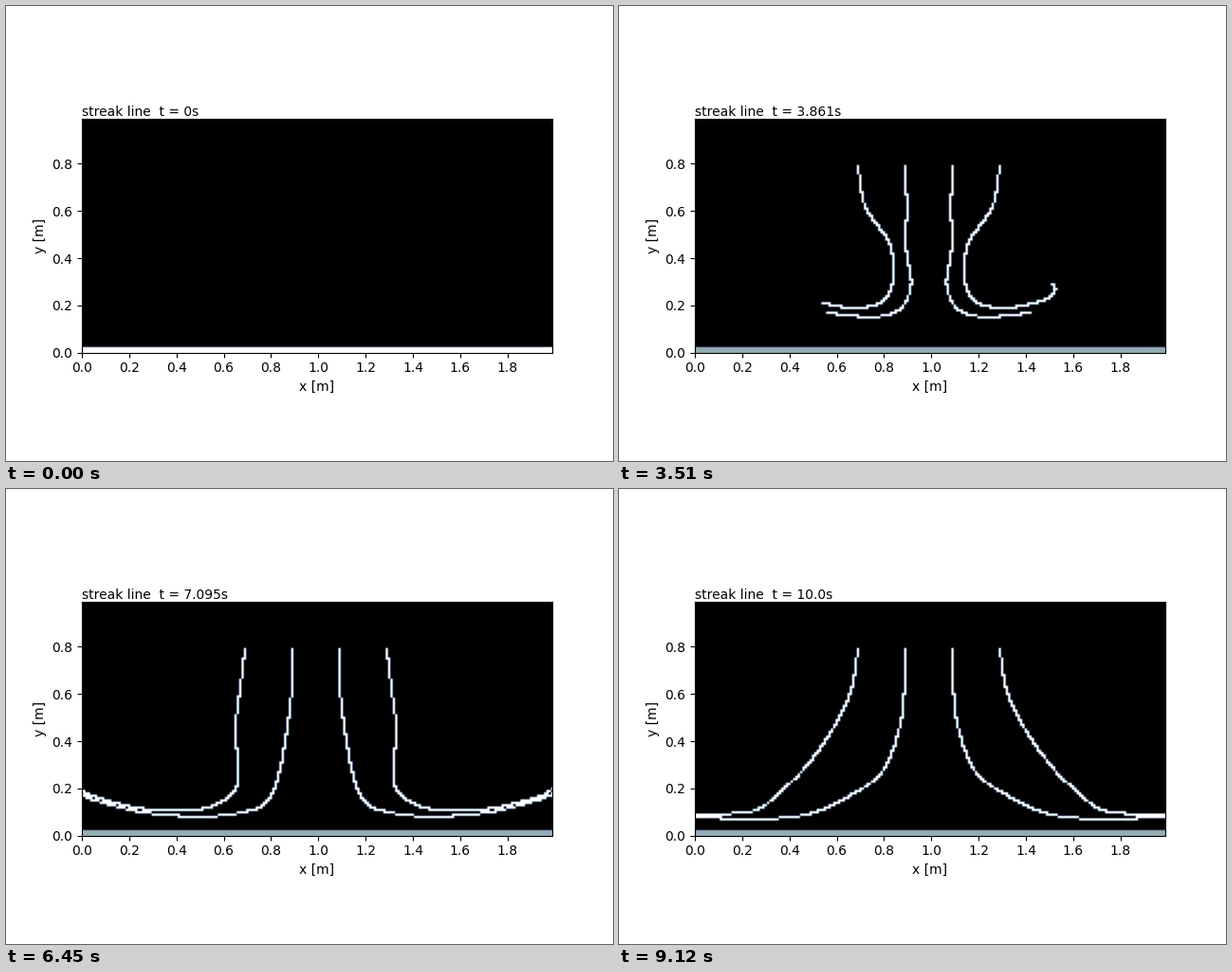
These frames come from a looping animation (640x480 px, 9.15 s). A matplotlib script:

```python
import numpy as np
import matplotlib.pyplot as plt
from matplotlib.animation import FuncAnimation

FRAMES, INTERVAL = 305, 30
NX, NY, STEP = 200, 100, 0.01
WALL, DYE = 1.0, 1.5
AXIS, INLET = 99, 79        # jet axis column and dye inlet row
GROWN = 2.28                # seconds until the dye reaches the wall
SAMPLES = 800


def spline(points):
    """Centripetal spline, resampled evenly along its length."""
    p = np.array(points, float)
    u = np.r_[0, np.cumsum(np.sqrt(np.hypot(*np.diff(p, axis=0).T)))]
    m = np.gradient(p, u, axis=0)
    v = np.linspace(0, u[-1], SAMPLES)
    i = np.clip(np.searchsorted(u, v, side="right") - 1, 0, len(u) - 2)
    h = (u[i + 1] - u[i])[:, None]
    w = (v - u[i])[:, None] / h
    curve = ((1 + 2 * w) * (1 - w) ** 2 * p[i] + w * (1 - w) ** 2 * h * m[i]
             + w * w * (3 - 2 * w) * p[i + 1] + w * w * (w - 1) * h * m[i + 1])
    s = np.r_[0, np.cumsum(np.hypot(*np.diff(curve, axis=0).T))]
    even = np.linspace(0, s[-1], SAMPLES)
    return np.column_stack([np.interp(even, s, c) for c in curve.T])


def streak(tau, outer, curl=False):
    """One streak as (distance from axis, height), in cells."""
    near = np.exp(-tau / 1.6)
    spread = 1 - np.exp(-(tau / 3.6) ** 2)
    rise = 2 + 0.18 * tau ** 2 + 3 * near
    reach = 20.3 * tau ** 1.1

    if outer:
        start, shoulder, waist = 30, 33 - 13 * near, 13 + 28.5 * spread
        slide = tau ** 1.45
        ankle, knee, gap = 12 + 2.65 * slide, 14.7 + 2.9 * slide, 6
        floor, low = 9 + 22 * near, 19.5 + 9.9 * tau
        bend, tip = 0.014 - 0.002 * tau, 20 + reach
    else:
        start, shoulder, waist = 10, 10.4 - 2.2 * near, 12.7 - 6.5 * near
        ankle, knee, gap = 6 + 14.5 * spread, 9 + 2.1 * tau ** 1.25, 9
        floor, low = 7 + 18 * near, 13.5 + 9.4 * tau
        bend, tip = 0.007 - 0.0007 * tau, 17.5 + reach

    size = tau + 0.3
    if curl:
        tip = 32 + 17.5 * tau
    end = tip - 1.5 * size if curl else tip

    # Down the jet, round the knee, then out along the wall.
    path = [(start, INLET), (shoulder, 62), (waist, 45),
            (ankle, floor + rise + gap), (knee, floor + rise),
            (knee + 0.4 * (low - knee), floor + 0.2 * rise)]
    path += [(d, floor + bend * (d - low) ** 2)
             for d in np.linspace(low, end, 4)]
    if curl:
        y = path[-1][1]
        path += [(tip, y + 2 * size), (tip - size, y + 3.8 * size)]
    return spline(path)


def field(sec):
    grid = np.zeros((NY, NX))
    grid[:3] = WALL
    # The dye first grows out of the inlet, then the whole streak moves.
    shown = int(SAMPLES * min(sec / GROWN, 1))
    for side in (-1, 1):
        for outer in (False, True):
            line = streak(max(sec - GROWN, 0), outer, outer and side > 0)
            d, y = line[:shown].T
            x = np.rint(AXIS + side * d).astype(int)
            y = np.rint(y).astype(int)
            ok = (x >= 0) & (x < NX) & (y >= 0) & (y < NY)
            grid[y[ok], x[ok]] = DYE
    return grid


fig, ax = plt.subplots(figsize=(6.4, 4.8), dpi=100)
half = STEP / 2
image = ax.imshow(field(0), cmap="bone", origin="lower",
                  interpolation="hanning", vmin=0, vmax=WALL,
                  extent=(-half, NX * STEP - half, -half, NY * STEP - half))
ax.set(xlim=(0, 1.99), ylim=(0, 0.99), xlabel="x [m]", ylabel="y [m]",
       xticks=np.arange(10) * 0.2, yticks=np.arange(5) * 0.2)
clock = ax.text(0, 1.004, "")


def update(n):
    image.set_data(field(n * INTERVAL / 1000))
    image.set_clim(0, DYE if n else WALL)
    t = min(round(0.033 * n, 3), 10.0) if n else 0
    clock.set_text(f"streak line  t = {t}s")
    return image, clock


anim = FuncAnimation(fig, update, frames=FRAMES, interval=INTERVAL,
                     repeat=True, repeat_delay=0)
plt.show()
```
